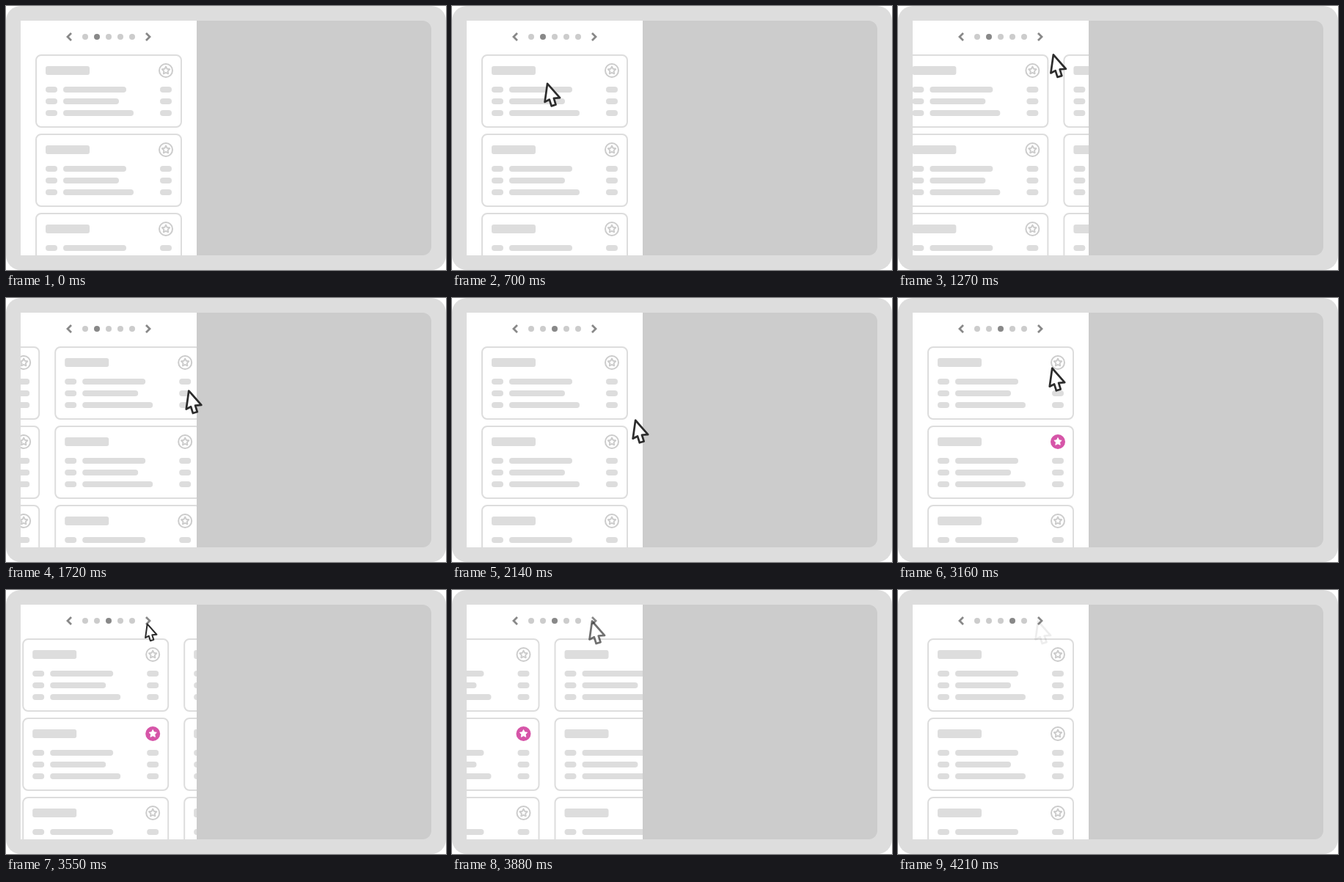
These frames come from a looping animation (600 px wide and 360 px high, 4570 ms). An HTML page:

```html
<!DOCTYPE html>
<html lang="en">
<head>
<meta charset="utf-8">
<title>Card pager</title>
<style>
  html, body { margin: 0; width: 100%; height: 100%; overflow: hidden; background: #fff; }
  svg { display: block; width: 600px; height: 360px; }
  .bar { fill: #ddd; }
  .ring { fill: none; stroke: #ccc; stroke-width: 2; stroke-linejoin: round; }
  .chevron { fill: none; stroke: #888; stroke-width: 2.8; }
  .badge { fill: #d655a8; }
  .badge + path { fill: #fff; stroke: #fff; stroke-linejoin: round; }
</style>
</head>
<body>
<svg viewBox="0 0 600 360">
  <defs>
    <clipPath id="panel"><rect x="20" y="20" width="240" height="320"/></clipPath>
    <g id="card">
      <rect x="41" y="1" width="198" height="98" rx="7" fill="#fff" stroke="#ddd" stroke-width="2"/>
      <rect class="bar" x="54" y="16" width="60" height="12" rx="3"/>
      <g id="rows"></g>
    </g>
  </defs>
  <rect width="600" height="360" rx="20" fill="#ddd"/>
  <path d="M20 20H568a12 12 0 0 1 12 12V328a12 12 0 0 1-12 12H20z" fill="#ccc"/>
  <g clip-path="url(#panel)">
    <rect x="20" y="20" width="240" height="320" fill="#fff"/>
    <g id="strip"></g>
  </g>
  <g id="dots"></g>
  <path class="chevron" d="M89 37l-5 5 5 5M191 37l5 5-5 5"/>
  <path id="cursor" d="M0 0L-3.5 25 2.8 21.7 5.6 30.5 11.5 28.7 8.8 20 17 19.3z"
    fill="#fff" stroke="#2c2c2c" stroke-width="2.7" stroke-linejoin="round"/>
</svg>
<script>
const LOOP = 4570, FIRST = 370, LAST = 4210, STEP = 30;
const PITCH = 220, SLIDE = 840, DOT_DELAY = 735;
const SLIDES = [1015, 3370];
const FAVOUR = 2640, CLICKS = [1090, FAVOUR, 3550];

const entry = { x: 24, y: 190 }, arrow = { x: 191, y: 42.5 }, star = { x: 217, y: 192 };
const moves = [
  { from: entry, bend: { x: 160, y: 89 }, to: arrow, start: 370, end: 1060 },
  { from: arrow, bend: { x: 302, y: 163 }, to: star, start: 1120, end: 2570 },
  { from: star, bend: { x: 226, y: 118 }, to: arrow, start: 2740, end: 3390 }
];

const $ = id => document.getElementById(id);
function add(parent, tag, attrs) {
  const el = document.createElementNS('http://www.w3.org/2000/svg', tag);
  for (const k in attrs) el.setAttribute(k, attrs[k]);
  return parent.appendChild(el);
}

function starPath(outer, inner) {
  const corner = (_, i) => {
    const a = i * Math.PI / 5, r = i % 2 ? inner : outer;
    return `${r * Math.sin(a)} ${-r * Math.cos(a)}`;
  };
  return 'M' + Array.from({ length: 10 }, corner).join('L') + 'z';
}

// Circle with a star, centred in the card's corner
function addStar(card, kind, radius, outer, inner) {
  const g = add(card, 'g', { transform: 'translate(218 22)' });
  add(g, 'circle', { class: kind, r: radius });
  add(g, 'path', { class: kind === 'ring' ? kind : '', d: starPath(outer, inner) });
  return g;
}

[86, 76, 96].forEach((middle, i) => {
  const bar = (x, width) =>
    add($('rows'), 'rect', { class: 'bar', x, y: 44 + 16 * i, width, height: 8, rx: 4 });
  bar(54, 16);
  bar(78, middle);
  bar(210, 16);
});

let plain, badge;
for (let page = 0; page < 3; page++) {
  for (let row = 0; row < 3; row++) {
    const card = add($('strip'), 'g', { transform: `translate(${page * PITCH} ${66 + row * 108})` });
    add(card, 'use', { href: '#card' });
    const ring = addStar(card, 'ring', 9, 5.4, 2.8);
    if (page === 1 && row === 1) {
      plain = ring;
      badge = addStar(card, 'badge', 10, 5.4, 2.7);
    }
  }
}
const dots = Array.from({ length: 5 }, (_, i) =>
  add($('dots'), 'circle', { cx: 108 + 16 * i, cy: 42, r: 4 }));

const clamp = u => Math.max(0, Math.min(1, u));
const part = (t, start, length) => clamp((t - start) / length);
const show = (el, on) => el.setAttribute('visibility', on ? 'visible' : 'hidden');

// cubic-bezier(.42, 0, .78, 1), solved by halving
function ease(x) {
  let lo = 0, hi = 1;
  for (let i = 0; i < 24; i++) {
    const s = (lo + hi) / 2, v = 1 - s;
    if (1.26 * s * v * v + 2.34 * s * s * v + s * s * s < x) lo = s; else hi = s;
  }
  return lo * lo * (3 - 2 * lo);
}

function cursorAt(t) {
  const m = moves.filter(m => t >= m.start).pop() || moves[0];
  const u = part(t, m.start, m.end - m.start), v = 1 - u;
  const mix = k => m.from[k] * v * v + m.bend[k] * 2 * u * v + m.to[k] * u * u;
  return { x: mix('x'), y: mix('y') };
}

const press = t => CLICKS.reduce((size, c) =>
  size - .25 * Math.sin(Math.PI * part(t, c - 120, 240)) ** 2, 1);

function draw(time) {
  const t = time < FIRST ? 0
    : Math.min(LAST, FIRST + STEP * Math.floor((time - FIRST) / STEP));

  const pages = SLIDES.reduce((sum, s) => sum + ease(part(t, s, SLIDE)), 0);
  $('strip').setAttribute('transform', `translate(${-pages * PITCH} 0)`);

  const active = 1 + SLIDES.filter(s => t >= s + DOT_DELAY).length;
  dots.forEach((dot, i) => dot.setAttribute('fill', i === active ? '#888' : '#ccc'));

  const pop = 1 + .5 * Math.sin(Math.PI * part(t, FAVOUR, 200));
  badge.setAttribute('transform', `translate(218 22) scale(${pop})`);
  show(badge, t >= FAVOUR);
  show(plain, t < FAVOUR);

  // Clicks shrink the cursor around its middle
  const { x, y } = cursorAt(t);
  $('cursor').setAttribute('transform',
    `translate(${x + 6.75} ${y + 15.25}) scale(${press(t)}) translate(-6.75 -15.25)`);
  $('cursor').setAttribute('opacity', part(t, 340, 150) - .92 * part(t, 3760, 340));
}

const start = performance.now();
function tick() {
  draw((performance.now() - start) % LOOP);
  requestAnimationFrame(tick);
}
tick();
</script>
</body>
</html>
```
